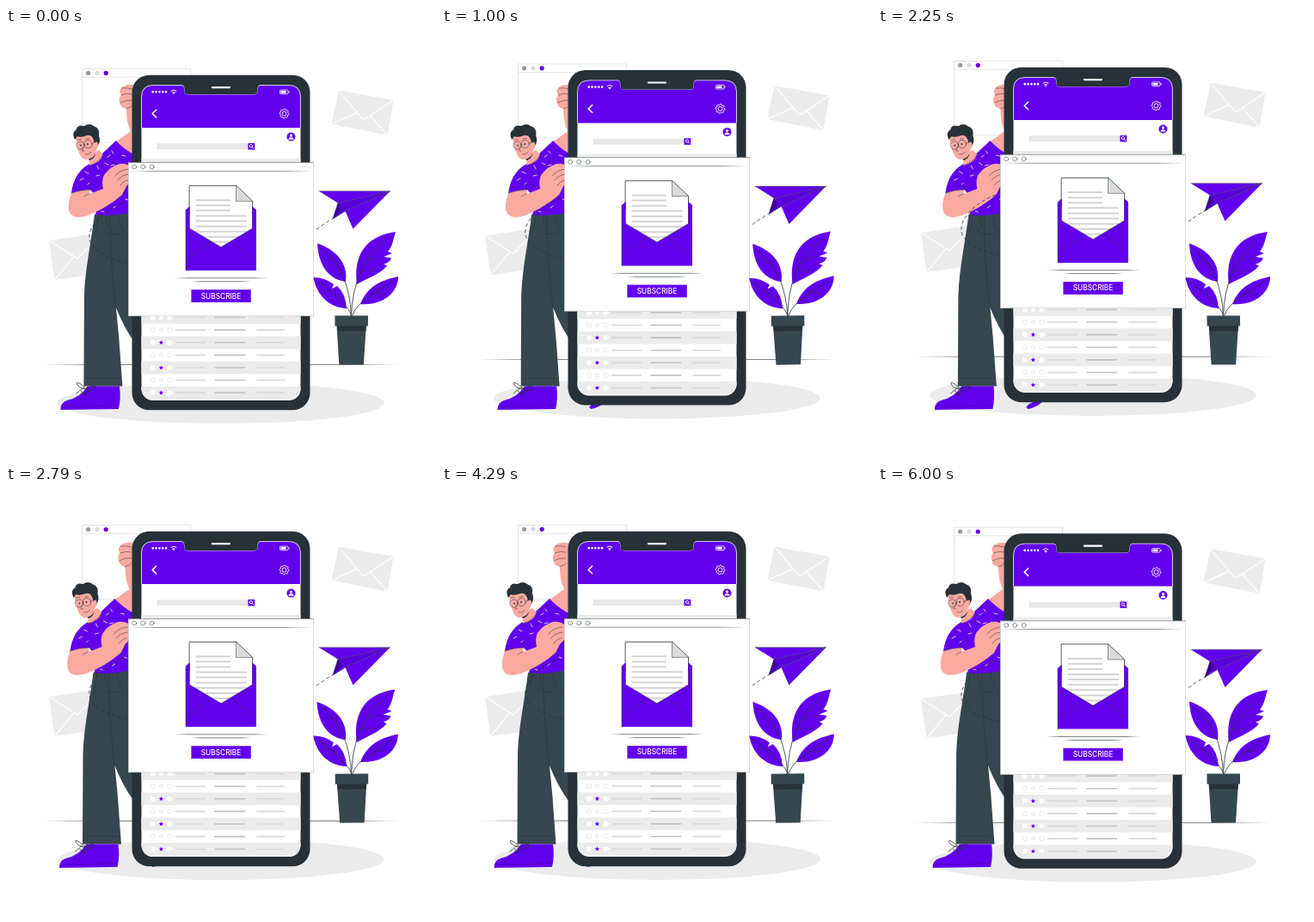
An HTML page that plays this animation: 500 by 500 pixels, repeating every 6040 ms.

```html
<!DOCTYPE html>
<html lang="en">
<head>
<meta charset="utf-8">
<title>Newsletter</title>
<style>
html, body { margin: 0; width: 100%; height: 100%; overflow: hidden; background: #fff; }
svg { display: block; width: 100vw; height: 100vh; }
.p { fill: #6200ee; } .d { fill: #263238; } .g { fill: #ebebeb; } .w { fill: #fff; }
.s { fill: #f9a9a0; } .t { fill: #37474f; }
.ink, .fine, .white { fill: none; stroke: #263238; stroke-width: .8; stroke-linecap: round; stroke-linejoin: round; }
.fine { stroke-width: .5; }
.white { stroke: #fff; stroke-width: 1.2; }
text { font: 500 8.3px Inter, "Open Sans", sans-serif; fill: #fff; text-anchor: middle; }
</style>
</head>
<body>
<svg viewBox="0 0 500 500">
  <defs>
    <clipPath id="screen"><rect x="157.500" y="66.500" width="185" height="366.500" rx="13.500"/></clipPath>
    <linearGradient id="fade">
      <stop offset="0" stop-color="#263238" stop-opacity="0"/>
      <stop offset=".15" stop-color="#263238"/>
      <stop offset=".85" stop-color="#263238"/>
      <stop offset="1" stop-color="#263238" stop-opacity="0"/>
    </linearGradient>
  </defs>

  <g class="float">
    <ellipse class="g" cx="250" cy="436" rx="190" ry="24"/>
    <rect x="42" y="390.900" width="415" height=".6" fill="url(#fade)"/>
    <rect x="88.500" y="47.500" width="126" height="86" fill="#fff" stroke="#dedede" stroke-width=".8"/>
    <path d="M88.500 57.200H214.500" stroke="#dedede" stroke-width=".8"/>
    <circle cx="95.600" cy="52.400" r="2.600" fill="#999"/>
    <circle cx="106" cy="52.400" r="2.600" fill="#dadada"/>
    <circle class="p" cx="116.200" cy="52.400" r="2.600"/>
    <path class="g" d="M386.500 72.500L450.500 84L443.500 124.500L378.500 111.500Z"/>
    <path class="white" d="M386.500 72.500L414 105Q416 106.500 418 105.500L450.500 84M378.500 111.500L408 98.500M443.500 124.500L424 102"/>
    <path class="g" d="M50 247L112 238L118 284L56.500 293Z"/>
    <path class="white" d="M50 247L83 268L112 238M56.500 293L79 265.500"/>
  </g>

  <g id="man">
    <path class="p" d="M170 441Q173 435 184 434L191 428V432Q184 441 172 443Z"/>
    <path class="t" d="M103 217Q123 211 150 213V366Q138 350 127.500 324L126 304Q132 360 135.500 416.500H90.500L91 312C92 280 99 250 103 217Z"/>
    <path class="fine" d="M121 218Q121 265 125.500 304L127.500 324M107 217Q108 233 100 243M116 215L118 232M114 236Q121 242 132 239M92 407.500H134M131 218Q132 234 145 244"/>
    <path class="p" d="M63.500 444Q63 436 71 433Q86 430 95 416.500H132Q134 430 131 443Z"/>
    <path d="M64 440Q99 441 131.500 438" fill="none" stroke="#4b00b8" stroke-width=".7"/>
    <path class="ink" d="M92 418Q80 408 83 415Q88 422 99 417Q106 415 104 420Q97 423 89 419L82 425M97 422L88 426M87 422L95 428"/>
    <path class="s" d="M120 138L145 120Q140 110 140 94Q132 92 133 87Q130 82 134 78Q130 72 136 68Q143 64 152 67V151L128 152Z"/>
    <path class="fine" d="M134 78Q141 75 147 77M133 87Q140 83 147 84M135 70Q141 69 147 71M140 94Q146 92 147 90"/>
    <path class="p" d="M97 158Q103 153 112 146L128 131Q136 140 150 148V213Q125 220 104 217Q107 207 105 196L98 188Q86 189 76 192Q79 168 97 158Z"/>
    <path class="s" d="M97 155L98 147L108 142L113 147Q110 157 97 160Z"/>
    <path class="s" d="M81 127Q82 140 87 149Q92 156 98 151Q107 143 108 132Q108 123 98 121Q86 120 81 127Z"/>
    <path class="d" d="M80 130Q76 121 82 118Q83 112 91 114Q97 110 102 114Q110 117 108 125Q111 132 106 138Q103 141 101.500 138Q104 132 101 128Q99 124 94 125Q87 128 83 126Z"/>
    <path class="s" d="M101 135Q107 129 107 136Q105 142 101 140Z"/>
    <g class="fine"><circle cx="86.500" cy="136.500" r="4.600"/><circle cx="95.500" cy="135" r="4.700"/><path d="M91 136Q91 134 92 135M100 134L106 132M83 130L87 129.500M93 129L97 128.500M90 138L88.500 143L91 143"/></g>
    <circle class="d" cx="87" cy="136.500" r=".9"/><circle class="d" cx="95" cy="135" r=".9"/>
    <path class="fine" d="M92 147Q96 148 99 144.500"/>
    <path class="d" d="M96 152Q101 152 104 146Q104 151 97 154Z"/>
    <path class="s" d="M76 192Q87 188 98 188L97 193L113 187Q111 178 114 171Q121 161 132 158Q141 157 148 163V176L140 184L135 194Q118 209 95 218Q81 223 75 216Q70 208 76 192Z"/>
    <path class="fine" d="M143 164Q132 165 127 172M143 170Q134 171 130 177M142 177Q136 178 133 183M76 192Q87 188 98 188L96 178M97 193Q93 194 91 196M113 147Q109 156 97 160"/>
    <path d="M92 167l4 2M86 177l4 -2M106 160l2 4M115 157l4 2M105 172l4 -1M123 143l2 3M135 148l4 1M118 150l3 -2M122 160l4 -1M95 182l2 -2M111 213l3 1M125 209l3 -2M139 199l3 1" stroke="#fff" stroke-width=".8" stroke-linecap="round"/>
  </g>

  <g class="float">
    <path class="ink" style="stroke-linecap:butt" stroke-dasharray="4 3" d="M137 203C110 213 90 236 99 251C107 264 126 270 146 275"/>
    <rect class="d" x="146.500" y="54.700" width="207" height="389.500" rx="20"/>
    <g clip-path="url(#screen)">
      <path class="w" d="M157 66H343V434H157Z"/>
      <path class="p" d="M157 66H343V116H157Z"/>
      <g id="rows"></g>
      <path class="g" d="M157 152H343V160H157Z"/>
    </g>
    <path d="M157.500 116V80Q157.500 66.500 171 66.500H204Q207.500 66.500 207.500 70V73Q207.500 77 211.500 77H288Q292.500 77 292.500 73V70Q292.500 66.500 296 66.500H329Q342.500 66.500 342.500 80V116" fill="none" stroke="#fff" stroke-width=".7"/>
    <path class="d" d="M204 65.500Q207.500 66.500 207.500 70V73Q207.500 77 211.500 77H288Q292.500 77 292.500 73V70Q292.500 66.500 296 65.500Z"/>
    <path class="white" style="stroke-width:2.200" d="M240 69.100H260"/>
    <path d="M170.700 74.200H187" stroke="#fff" stroke-width="2.700" stroke-linecap="round" stroke-dasharray="0 3.850"/>
    <path class="white" style="stroke-width:1" d="M192 73.200Q195 70.700 198 73.200M193.500 75Q195 73.700 196.500 75"/>
    <circle class="w" cx="195" cy="76.200" r=".8"/>
    <rect x="318.500" y="72" width="9.500" height="4.600" rx="1" fill="none" stroke="#fff" stroke-width=".8"/>
    <path class="w" d="M319.500 73h6v2.600h-6zM328.500 73.400h1v1.800h-1z"/>
    <path class="white" style="stroke-width:1.500" d="M174.700 95.200L170.200 99.500L174.700 103.800"/>
    <g fill="none" stroke="#fff" stroke-width=".9">
      <polygon id="gear" stroke-linejoin="round"/>
      <circle cx="323.500" cy="99.500" r="2.500"/>
    </g>
    <circle class="p" cx="331.500" cy="126.500" r="5"/>
    <circle class="w" cx="331.500" cy="124.900" r="1.600"/>
    <path class="w" d="M328.500 129.600Q328.500 127 331.500 127T334.500 129.600Z"/>
    <path fill="#e6e6e6" d="M175.500 134.300H282V141H175.500Z"/>
    <path class="p" d="M281.500 133.800H289.300V141.400H281.500Z"/>
    <circle cx="284.900" cy="137" r="1.600" fill="none" stroke="#fff" stroke-width=".9"/>
    <path class="white" style="stroke-width:1" d="M286.200 138.300L287.500 139.700"/>

    <rect class="w" x="142.300" y="156.300" width="215.200" height="178.500" stroke="#c4c4c4" stroke-width=".6"/>
    <path class="fine" d="M142.300 156.300H357.500" opacity=".7"/>
    <rect x="142" y="165.900" width="215" height=".5" fill="url(#fade)"/>
    <g class="fine"><circle cx="149.200" cy="161.400" r="2.500"/><circle cx="159.200" cy="161.400" r="2.500"/><circle cx="169.600" cy="161.400" r="2.500"/></g>
    <path fill="#4b00b8" d="M209 212L214 207H286L291 212L250 260Z"/>
    <path class="ink" style="fill:#fff" d="M213.500 183.300H267.500L286.500 201.300V240L250 262L213.500 240Z"/>
    <path class="fine" style="fill:#dadada" d="M267.500 183.300V201.300H286.500Z"/>
    <path d="M220.500 200.100H261M220.500 206.200H261M220.500 212.300H261M220.500 218.400H280M220.500 224.500H280M220.500 230.600H280M220.500 236.700H280M228 242.800H272M240 248.800H260" stroke="#d4d4d4" stroke-width="2"/>
    <path class="p" d="M209 211.500L213.500 207.500V233L250 254.700L286.500 233V207.500L291 211.500V282H209Z"/>
    <path class="fine" d="M213 268.500L238.500 248.500M287 268.500L261.500 248.500M209 212V282M213.500 233L250 254.700L286.500 233"/>
    <rect x="195" y="290.500" width="110" height=".6" fill="url(#fade)"/>
    <rect x="215" y="294.500" width="70" height=".6" fill="url(#fade)"/>
    <rect class="p" x="215.400" y="304.200" width="69.400" height="14.700"/>
    <text x="250" y="314.500">SUBSCRIBE</text>

    <path class="p" d="M364 189.700H446.500L386 203.500Z"/>
    <path fill="#5a00dc" d="M386 203.500L446.500 189.700L394.500 213L380 222Z"/>
    <path fill="#3f0099" d="M386 203.500L380 222L391 211Z"/>
    <path class="p" d="M446.500 189.700L403.500 233.500L394.500 213Z"/>
    <path class="fine" d="M364 189.700H446.500L386 203.500L380 222L394.500 213L446.500 189.700"/>
    <path class="ink" stroke-dasharray="4 3" style="stroke-linecap:butt" d="M361 234Q370 227.500 380 221.500"/>
  </g>

  <g id="plant">
    <path class="p" d="M408 298C404 268 415 242 453 237C450 245 450 253 444 260L449 262L439 266L448 267.500Q446 273 439 274.500L443 276.500C434 287 420 291 408 298Z"/>
    <path class="p" d="M395 295C374 292 363 275 362 250.500C381 257 398 271 395 295Z"/>
    <path class="p" d="M396 326C376 325 361 311 357.500 290C367 290 374 293 381 298L379 303L385 300Q395 309 396 326Z"/>
    <path class="p" d="M412 321C420 300 437 293 456 289C456 308 438 323 412 321Z"/>
    <path class="ink" d="M401.500 336Q402 308 412 284Q424 261 440 248M401.500 336Q401 311 392 289Q382 269 367 257M402 336Q400 327 391 320Q374 303 363 295M402 336Q407 322 421 314Q439 302 450 294"/>
    <path class="fine" d="M412 284Q411 272 413 266M420 270L436 267M413 282L431 282M386 276L385 266M379 270L371 270M383 312L382 304M376 306L368 305M426 311L430 303M430 308L441 309"/>
    <path class="t" d="M384.500 345H419L416 391.500H387.500Z"/>
    <path class="d" d="M385 346H419L418.500 352.500H385.500Z"/>
    <path class="t" d="M382.500 334.500H421V346.500H382.500Z"/>
  </g>
</svg>
<script>
const LOOP = 6040, BOB = LOOP / 4, LEAD = 40;
const floats = document.querySelectorAll(".float");
const man = document.getElementById("man");
const plant = document.getElementById("plant");

// Points around a centre; radius(i) shapes the outline.
const ring = (x, y, count, radius) => Array.from({ length: count }, (_, i) => {
  const a = i * 2 * Math.PI / count;
  return `${(x + radius(i) * Math.sin(a)).toFixed(2)},${(y - radius(i) * Math.cos(a)).toFixed(2)}`;
}).join(" ");

document.getElementById("gear").setAttribute("points",
  ring(323.5, 99.5, 32, i => i % 4 < 2 ? 5.5 : 4.4));

// Inbox list: shaded rows carry the marked stars.
function row(i) {
  const y = 336.5 + i * 14.6, shaded = i % 2 === 0;
  const icon = `fill="#fff" stroke="${shaded ? "#fff" : "#e3e3e3"}" stroke-width=".7"`;
  const line = (x1, x2, color) =>
    `<path d="M${x1} ${y}H${x2}" stroke="${color}" stroke-width="1.600" stroke-linecap="round"/>`;
  return (shaded ? `<rect class="g" x="157" y="${y - 7.3}" width="186" height="14.600"/>` : "") +
    `<rect x="168.500" y="${y - 2.3}" width="4.800" height="4.600" rx=".6" ${icon}/>` +
    `<polygon points="${ring(180.4, y, 10, k => k % 2 ? 1.3 : 2.8)}" ${shaded && i ? 'class="p"' : icon}/>` +
    `<path d="M188 ${y - 2.3}h3.800l2 2.300l-2 2.300h-3.800z" ${icon}/>` +
    line(197.5, 231.5, "#d8d8d8") + line(243, 277.5, "#c2c2c2") + line(292, 323.5, "#d8d8d8");
}
document.getElementById("rows").innerHTML = Array.from({ length: 7 }, (_, i) => row(i)).join("");

// Linear interpolation through evenly spaced keys, u in 0..1.
function keys(values, u) {
  const p = u * (values.length - 1), i = Math.min(Math.floor(p), values.length - 2);
  return values[i] + (values[i + 1] - values[i]) * (p - i);
}

const SHAKE = [0, -1, 2, -4, 4, -4, 4, -4, 2, -1, 0];
const BOUNCE = [.6, -9.4, .6];
const SWAY = [0, 1, 0, -1, 0];

function draw(now) {
  const t = (now + LEAD) % LOOP, beat = t % BOB / BOB;
  const lift = `translate(0 ${keys(BOUNCE, beat).toFixed(3)})`;
  floats.forEach(g => g.setAttribute("transform", lift));
  man.setAttribute("transform", `translate(${keys(SHAKE, t / LOOP).toFixed(3)} 0)`);
  plant.setAttribute("transform", `rotate(${keys(SWAY, beat).toFixed(3)} 407 314)`);
}

const start = performance.now();
function tick() {
  draw(performance.now() - start);
  requestAnimationFrame(tick);
}
draw(0);
requestAnimationFrame(tick);
</script>
</body>
</html>
```
